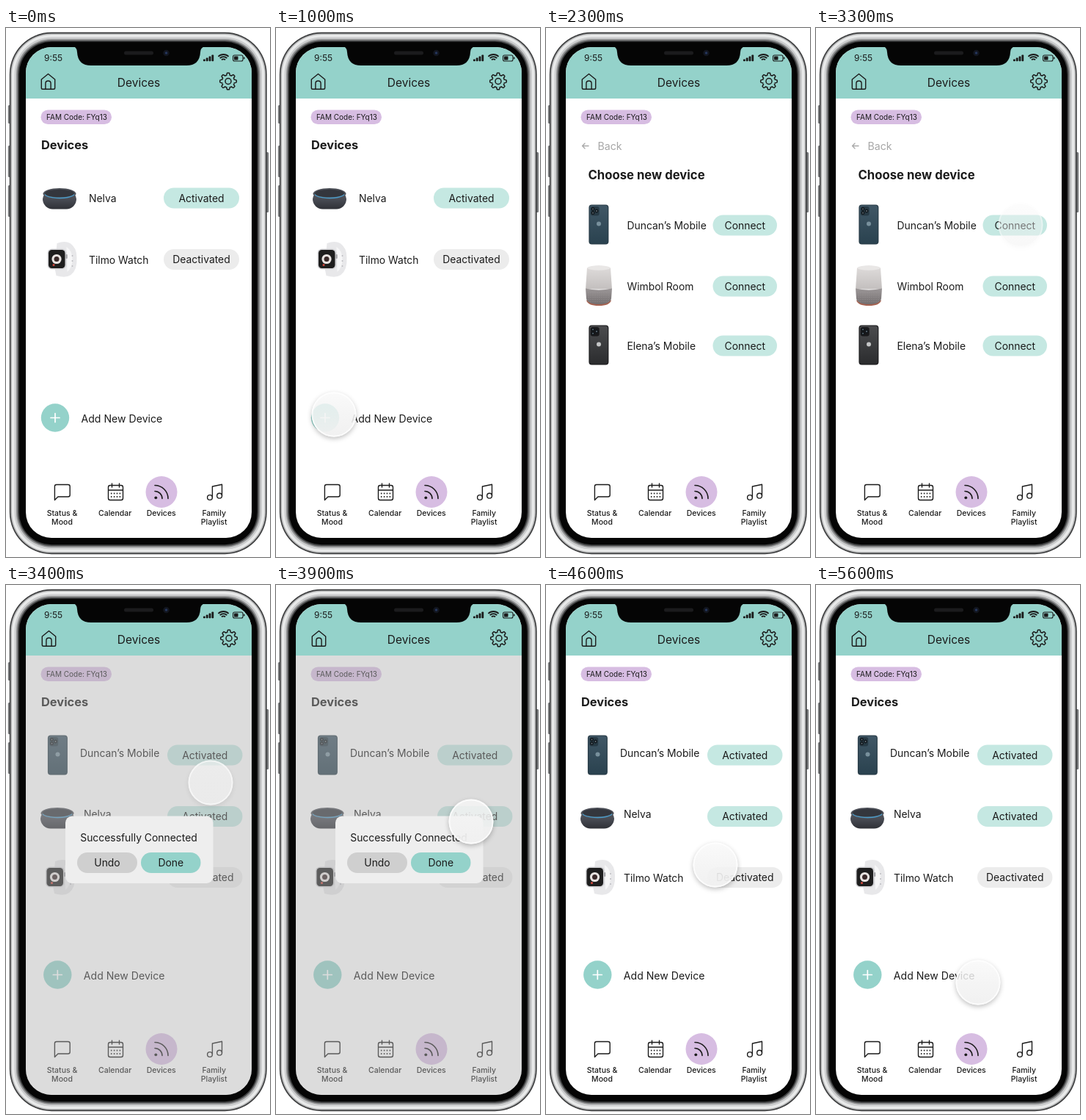
Animation of 360 by 720 pixels, one loop 5700 ms. Source, as an HTML page with a canvas:

```html
<!DOCTYPE html>
<html lang="en">
<head>
<meta charset="utf-8">
<title>Devices</title>
<style>
html, body { margin: 0; width: 100%; height: 100%; overflow: hidden; background: #fff; }
canvas { display: block; width: 360px; height: 720px; }
</style>
</head>
<body>
<canvas id="stage"></canvas>
<script>
const LOOP = 5700, STEP = 100;
const INK = '#1b1b1b', TEAL = '#94d2ca', MINT = '#c5e8e2', LILAC = '#d7bde2';
const canvas = document.getElementById('stage');
const ctx = canvas.getContext('2d');
const ratio = window.devicePixelRatio || 1;
canvas.width = 360 * ratio;
canvas.height = 720 * ratio;

// ---- helpers ----
function box(x, y, w, h, r, fill) {
  ctx.beginPath();
  ctx.roundRect(x, y, w, h, r);
  if (fill) { ctx.fillStyle = fill; ctx.fill(); }
}

function disc(x, y, r, fill) {
  ctx.beginPath();
  ctx.arc(x, y, r, 0, Math.PI * 2);
  if (fill) { ctx.fillStyle = fill; ctx.fill(); }
}

function oval(x, y, rx, ry, fill) {
  ctx.beginPath();
  ctx.ellipse(x, y, rx, ry, 0, 0, Math.PI * 2);
  ctx.fillStyle = fill;
  ctx.fill();
}

function line(path, width = 1.4, color = INK) {
  ctx.strokeStyle = color;
  ctx.lineWidth = width;
  ctx.lineCap = ctx.lineJoin = 'round';
  ctx.stroke(new Path2D(path));
}

function shape(path, fill) {
  ctx.fillStyle = fill;
  ctx.fill(new Path2D(path));
}

function at(x, y, draw) {
  ctx.save();
  ctx.translate(x, y);
  draw();
  ctx.restore();
}

function text(str, x, y, size = 13.9, { align = 'left', weight = 400, color = INK } = {}) {
  ctx.font = `${weight} ${size}px Inter, "Open Sans", sans-serif`;
  ctx.textAlign = align;
  ctx.fillStyle = color;
  ctx.fillText(str, x, y + size * 0.36);
}

function blend(y0, y1, ...colors) {
  const g = ctx.createLinearGradient(0, y0, 0, y1);
  colors.forEach((c, i) => g.addColorStop(i / (colors.length - 1), c));
  return g;
}

function button(label, x, y, w, fill) {
  box(x, y - 14, w, 28, 14, fill);
  text(label, x + w / 2, y, 13.9, { align: 'center' });
}

// ---- handset ----
function shell() {
  ctx.fillStyle = '#fff';
  ctx.fillRect(0, 0, 360, 720);
  [[105, 25], [160, 43], [214, 43]].forEach(([y, h]) => box(2.8, y, 4, h, 1.5, '#77797b'));
  box(354, 169, 4.2, 82, 1.5, '#77797b');
  const rings = [[4.8, '#3c3d3e'], [6.4, '#b4b5b6'], [8, '#e9eaea'], [11.5, '#cbcccd'],
    [14, '#8c8d8e'], [16, '#434445'], [17.8, '#050505']];
  rings.forEach(([d, c]) => box(d, d + 1, 360.5 - 2 * d, 720 - 2 * d, 62 - d, c));
}

function notch() {
  shape('M92 25 H271 Q265 27 265 33 Q264 51 246 51 H116 Q98 51 97 33 Q97 27 92 25Z', '#050505');
  box(161, 31.5, 40, 5, 2.5, '#1b1b1d');
  disc(218.5, 34, 4.3, '#12151d');
  disc(218.5, 34, 1.8, '#25365c');
}

function header(shift) {
  ctx.fillStyle = TEAL;
  ctx.fillRect(26, 25, 310, 71);
  text('9:55', 52, 40.5, 12);
  for (let i = 0; i < 4; i++) box(269 + i * 3.8, 42.5 - i * 2, 2.8, 2.8 + i * 2, 0.8, INK);
  [3.6, 6.8, 10].forEach(r => {
    ctx.beginPath();
    ctx.arc(296.5, 46, r, -Math.PI * 0.75, -Math.PI * 0.25);
    ctx.strokeStyle = INK;
    ctx.lineWidth = 1.8;
    ctx.lineCap = 'butt';
    ctx.stroke();
  });
  box(309.6, 37, 13.4, 8, 2);
  ctx.lineWidth = 1.1;
  ctx.stroke();
  box(311, 38.5, 5.5, 5, 0.8, INK);
  box(324, 39.5, 1.4, 3, 0.7, INK);

  at(57.5 + shift, 73, () => {
    line('M-9.2 -3 L0 -10.5 L9.2 -3 V8.5 Q9.2 10.3 7.4 10.3 H-7.4 Q-9.2 10.3 -9.2 8.5Z');
    line('M-3.6 10 V2.5 Q-3.6 -1 0 -1 Q3.6 -1 3.6 2.5 V10');
  });
  at(303 + shift, 72.5, gear);
  text('Devices', 181, 74, 15.5, { align: 'center' });
}

function gear() {
  ctx.beginPath();
  for (let i = 0; i <= 160; i++) {
    const a = i / 160 * Math.PI * 2;
    const r = 9.9 + 1.4 * Math.max(-1, Math.min(1, 1.9 * Math.cos(8 * a)));
    ctx.lineTo(r * Math.sin(a), -r * Math.cos(a));
  }
  ctx.closePath();
  ctx.strokeStyle = INK;
  ctx.lineWidth = 1.5;
  ctx.stroke();
  disc(0, 0, 4);
  ctx.stroke();
}

function tabs() {
  disc(212, 631.5, 21.5, LILAC);
  line('M66.4 642.5 V624 Q66.4 621.5 68.9 621.5 H84.7 Q87.2 621.5 87.2 624 V635.5 Q87.2 638 84.7 638 H70.9Z');
  line('M142 622.5 H157 Q159.5 622.5 159.5 625 V640 Q159.5 642.5 157 642.5 H142 Q139.5 642.5 139.5 640 V625 Q139.5 622.5 142 622.5Z M139.5 629 H159.5 M144.5 620 V625 M154.5 620 V625');
  for (let i = 0; i < 8; i++) disc(143.7 + i % 4 * 3.9, i < 4 ? 633.5 : 638, 0.9, INK);
  line('M203 630.5 A10 10 0 0 1 213 640.5 M203 622.5 A18 18 0 0 1 221 640.5', 1.6);
  disc(204.3, 639.3, 1.9, INK);
  line('M281.4 639 V624 L294.5 621.3 V636.5');
  [[278, 639], [291.1, 636.7]].forEach(([x, y]) => { disc(x, y, 3.4); ctx.stroke(); });
  const labels = [['Status &', 76.5, 660], ['Mood', 76.5, 672.5], ['Calendar', 148.7, 660],
    ['Devices', 211.7, 660], ['Family', 283.7, 660], ['Playlist', 283.7, 672.5]];
  labels.forEach(([s, x, y]) => text(s, x, y, 10.5, { align: 'center', weight: 500 }));
}

// ---- products, drawn around their centre ----
function puck() {
  box(-23, -8, 46, 22.5, [9, 9, 14, 14], blend(-8, 14, '#565962', '#454850', '#303238'));
  oval(0, -6.5, 22.5, 7.5, '#4d5058');
  oval(0, -7, 20, 5.2, '#33363d');
  ctx.beginPath();
  ctx.ellipse(0, -6.5, 20.5, 6, 0, 0.2, Math.PI - 0.2);
  ctx.strokeStyle = '#4a9bc9';
  ctx.lineWidth = 1.3;
  ctx.stroke();
}

function watch() {
  shape('M-7 -22 Q4 -26 11 -22 Q20 -16 20 -3 Q21 14 12 21 Q5 26 -8 22 L-10 12 H5 V-12 H-8Z', '#e8e8ea');
  shape('M6 -17 Q14 -12 14 0 Q14 11 7 17Z', '#f6f6f7');
  [-5, 2, 9].forEach(y => disc(14, y, 1, '#bcbcc0'));
  box(-20, -14.5, 26, 28, 6, '#d2d2d5');
  box(-18.5, -13, 22.5, 25, 4.5, '#1e1e1e');
  box(5, -7, 2.2, 6, 1, '#a0a0a4');
  disc(-7.5, -0.5, 6.6, '#e9e4e2');
  disc(-7.5, -0.5, 3.5, '#3a2a2a');
  disc(-11.5, 7.5, 1.5, '#d2493e');
}

function phone(top, bottom, edge, badge) {
  box(-13.6, -27, 27, 54, 4, edge);
  box(-12.5, -26, 24.8, 52, 3.3, blend(-26, 26, top, bottom));
  box(-11.3, -24.5, 12, 12.5, 3, edge);
  [[-8, -21.2], [-8, -15.8], [-3, -18.5]].forEach(([x, y]) => {
    disc(x, y, 2.4, '#10161b');
    disc(x, y, 0.9, '#6d7b84');
  });
  disc(0, -1, 3, badge);
}
const bluePhone = () => phone('#405766', '#2a424f', '#273a45', '#78909c');
const blackPhone = () => phone('#4b4c4e', '#2b2c2e', '#19191b', '#c4c5c6');

function homeSpeaker() {
  shape('M-16 -24 Q0 -30 16 -24 L18 5 H-18Z', blend(-27, 5, '#e0dddc', '#c3bfbe'));
  oval(0, -24, 15.5, 3.2, '#e9e7e6');
  shape('M-17 20 Q-15 27.5 0 27.5 Q15 27.5 17 20Z', '#a5614f');
  shape('M-18 4 Q0 8 18 4 L17 18 Q15 25.5 0 25.5 Q-15 25.5 -17 18Z', blend(4, 26, '#9c9798', '#726d6e'));
  for (let y = 10; y < 24; y += 3)
    for (let x = -14; x < 15; x += 3) disc(x, y, 0.4, '#aaa4a4');
}

// ---- screens ----
function codeTag() {
  box(47.5, 111.5, 96.5, 19.5, 9.75, LILAC);
  text('FAM Code: FYq13', 55, 121.5, 10);
}

function addRow(x) {
  disc(x, 530.5, 19.2, TEAL);
  line(`M${x - 6} 530.5 h12 M${x} 524.5 v12`, 1.7, '#fff');
  text('Add New Device', x + 35.5, 531.5, 14.1);
}

function heading() {
  text('Devices', 48, 159.5, 16.4, { weight: 700 });
}

function listBefore() {
  heading();
  at(73, 232, puck);
  text('Nelva', 113, 232);
  button('Activated', 215, 231.5, 103, MINT);
  at(76.5, 315, watch);
  text('Tilmo Watch', 113, 315.5);
  button('Deactivated', 215, 315, 103, '#ececec');
  addRow(67);
}

function listAfter() {
  heading();
  at(70.5, 231.5, bluePhone);
  text('Duncan’s Mobile', 101, 229);
  button('Activated', 220, 231.5, 102.5, MINT);
  at(70, 317, puck);
  text('Nelva', 106, 311.5);
  button('Activated', 220, 315, 102.5, MINT);
  at(74, 398, watch);
  text('Tilmo Watch', 106, 398.5);
  button('Deactivated', 220, 398, 102.5, '#ececec');
  addRow(70.3);
}

function chooser() {
  line('M58 160.5 H49.5 M53 157 L49.5 160.5 L53 164', 1.3, '#a9a9a9');
  text('Back', 70.5, 160.5, 14.2, { color: '#a6a6a6' });
  text('Choose new device', 57.5, 200, 16.7, { weight: 700 });
  const rows = [[268, 'Duncan’s Mobile', bluePhone], [351, 'Wimbol Room', homeSpeaker],
    [432, 'Elena’s Mobile', blackPhone]];
  rows.forEach(([y, name, icon]) => {
    at(72, y - 0.5, icon);
    text(name, 110.5, y + 0.5);
    button('Connect', 227.5, y + 0.5, 87.5, MINT);
  });
}

function dialog() {
  ctx.fillStyle = 'rgba(174,174,174,.43)';
  ctx.fillRect(26, 96, 310, 600);
  box(81, 314.5, 201.5, 91.5, 9, '#eeeeee');
  text('Successfully Connected', 181, 344, 13.9, { align: 'center' });
  button('Undo', 97, 378, 82, '#cfcfcf');
  button('Done', 184, 378, 81.5, TEAL);
}

// ---- pointer: time, x, y, opacity ----
const TRACK = [
  [500, 79, 526, 0], [800, 79, 526, 1], [1700, 79, 526, 1], [2000, 79, 526, 0],
  [3100, 279, 268, 0], [3300, 279, 268, 0.5], [3500, 279, 270, 1], [3900, 266, 322, 1],
  [4300, 231, 381, 1], [4700, 231, 381, 1], [5300, 222, 536, 1], [5600, 221, 541, 1]
];

function pointerAt(t) {
  const i = TRACK.findIndex(k => k[0] > t);
  if (i === 0) return [0, 0, 0];
  if (i < 0) return TRACK[TRACK.length - 1].slice(1);
  const a = TRACK[i - 1], b = TRACK[i];
  const p = (t - a[0]) / (b[0] - a[0]);
  const inOut = t >= 4700 && t < 5300;
  const e = inOut ? p * p * (3 - 2 * p) : p;
  return [1, 2, 3].map(n => a[n] + (b[n] - a[n]) * e);
}

function pointer(t) {
  const [x, y, alpha] = pointerAt(t), r = 30.5;
  if (alpha <= 0) return;
  at(x, y, () => {
    ctx.globalAlpha = alpha;
    ctx.save();
    ctx.beginPath();
    ctx.rect(-60, -60, 120, 120);
    ctx.arc(0, 0, r, 0, Math.PI * 2);
    ctx.clip('evenodd');
    ctx.shadowColor = `rgba(0,0,0,${0.28 * alpha ** 3})`;
    ctx.shadowBlur = 7 * ratio;
    ctx.shadowOffsetY = 2.5 * ratio;
    disc(0, 0, r - 0.5, '#f4f4f4');
    ctx.restore();
    disc(0, 0, r, blend(-r, r, 'rgba(248,248,248,.76)', 'rgba(243,243,243,.86)', 'rgba(240,240,240,.97)'));
    disc(0, 0, r - 1);
    ctx.strokeStyle = 'rgba(255,255,255,.75)';
    ctx.lineWidth = 1.8;
    ctx.stroke();
  });
}

function draw(t) {
  ctx.setTransform(ratio, 0, 0, ratio, 0, 0);
  shell();
  ctx.save();
  box(27, 26, 308, 668, 35, '#fff');
  ctx.clip();
  header(t < 1200 ? 0 : 1);
  codeTag();
  if (t < 1200) listBefore();
  else if (t < 3400) chooser();
  else listAfter();
  tabs();
  if (t >= 3400 && t < 4400) dialog();
  pointer(t);
  ctx.restore();
  notch();
}

function tick() {
  const t = performance.now() % LOOP;
  draw(Math.floor(t / STEP) * STEP);
  requestAnimationFrame(tick);
}
tick();
</script>
</body>
</html>
```
